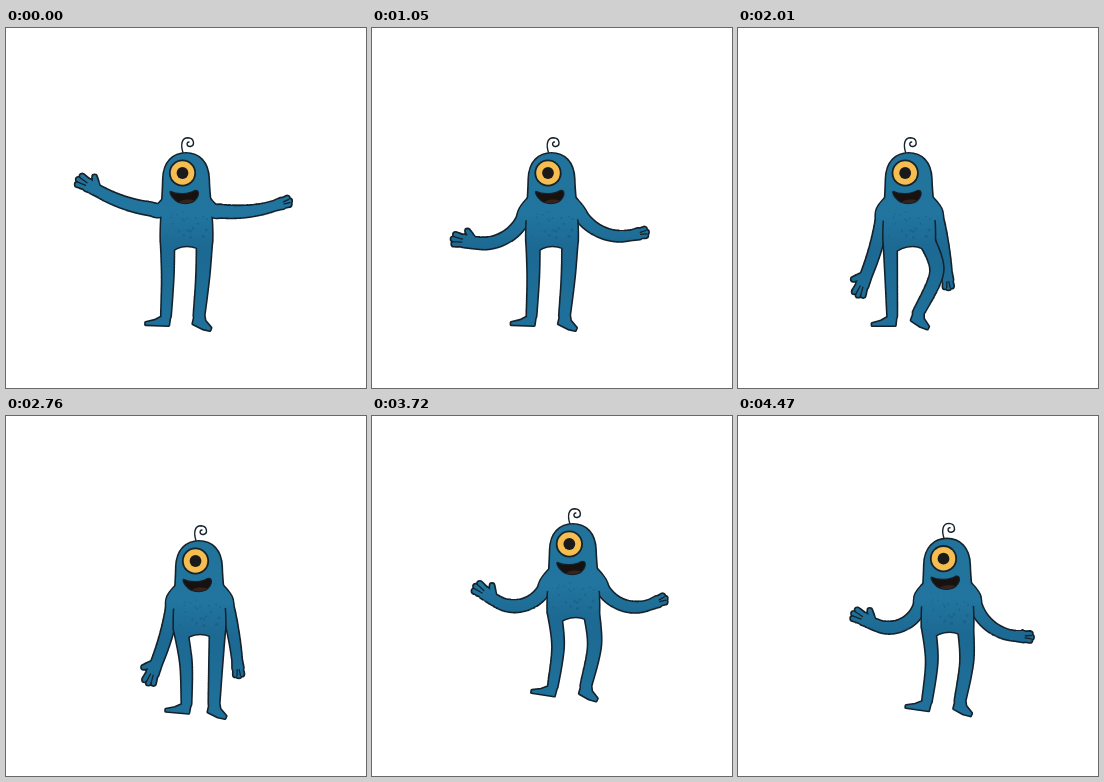
Animation, 360 px wide and 360 px high, one loop 4500 ms. Source, as an HTML page with a canvas:

```html
<!DOCTYPE html>
<html>
<head>
<meta charset="utf-8">
<title>Dancing monster</title>
<style>
html, body { margin: 0; width: 100%; height: 100%; overflow: hidden; background: #fff; }
canvas { display: block; width: 100vmin; height: 100vmin; }
</style>
</head>
<body>
<canvas id="stage" width="360" height="360"></canvas>
<script>
const ctx = document.getElementById('stage').getContext('2d');
const LOOP = 4500;
const INK = '#15222b';
const TAU = 2 * Math.PI;
const RAD = Math.PI / 180;

// An arm is an arc: heading at the shoulder, heading at the wrist (0 is outward, 90 is down).
// Knees give the sideways bend, feet the ankle offsets from the eye.
const pose = (left, right, knees, feet = [-16.5, 16.5]) => ({ left, right, knees, feet });

const open = pose([-4, -30], [10, -18], [1, 1]);
const shrug = pose([75, -10], [62, -12], [1, 1]);
const sidestep = pose([82, 68], [74, 84], [0, 14], [-13, 13]);
const stand = pose([82, 68], [74, 84], [2.5, 0], [-9, 18.5]);
const cheer = pose([52, -95], [66, -90], [7, 9]);
const drop = pose([90, 8], [74, 28], [2.5, 3.5]);
const greet = pose([88, -28], [82, 4], [4, 4]);

const timeline = [
  { time: 0, x: 176.5, ...open },
  { time: 540, x: 176.5, ...open },
  { time: 1050, x: 176, ...shrug },
  { time: 1640, x: 168, ...sidestep },
  { time: 2150, x: 167, ...sidestep },
  { time: 2760, x: 189.5, ...stand },
  { time: 3360, x: 192.5, ...cheer },
  { time: 4020, x: 201, ...drop },
  { time: 4470, x: 205.5, ...greet }
];

const mix = (a, b, k) => a + (b - a) * k;
const mixPair = (a, b, k) => a.map((v, i) => mix(v, b[i], k));

function poseAt(t) {
  const next = timeline.findIndex(key => key.time > t);
  if (next < 0) return timeline[timeline.length - 1];
  const a = timeline[next - 1], b = timeline[next];
  const u = (t - a.time) / (b.time - a.time);
  const k = u * u * (3 - 2 * u);
  const blended = { x: mix(a.x, b.x, k) };
  for (const part of ['left', 'right', 'knees', 'feet']) {
    blended[part] = mixPair(a[part], b[part], k);
  }
  return blended;
}

function bounce(t) {
  return t < 3350 ? 0 : 16 * Math.cos((t - 4364) / 459 * TAU) - 4;
}

function spline(p0, p1, p2, p3, u) {
  return p1.map((v, i) => v + 0.5 * u * (p2[i] - p0[i]
    + u * (2 * p0[i] - 5 * v + 4 * p2[i] - p3[i]
    + u * (3 * (v - p2[i]) + p3[i] - p0[i]))));
}

// Adds a tapered rounded tube through the points.
function tube(path, points, startWidth, endWidth, part = 1) {
  const spans = points.length - 1, detail = 20, steps = spans * detail;
  const at = i => points[Math.max(0, Math.min(spans, i))];
  for (let s = 0; s <= steps * part; s++) {
    const i = Math.min(spans - 1, Math.floor(s / detail));
    const [x, y] = spline(at(i - 1), at(i), at(i + 1), at(i + 2), s / detail - i);
    const r = mix(startWidth, endWidth, s / steps) / 2;
    path.moveTo(x + r, y);
    path.arc(x, y, r, 0, TAU);
  }
}

function polar([x, y], angle, length) {
  return [x + Math.cos(angle * RAD) * length, y + Math.sin(angle * RAD) * length];
}

function paint(path, fill) {
  ctx.strokeStyle = INK;
  ctx.lineWidth = 3.2;
  ctx.stroke(path);
  ctx.fillStyle = fill;
  ctx.fill(path);
}

function disc(x, y, r, fill) {
  ctx.fillStyle = fill;
  ctx.beginPath();
  ctx.arc(x, y, r, 0, TAU);
  ctx.fill();
}

function makeArm(x, side, headings, style) {
  const center = x + 4;
  const toStage = a => side < 0 ? 180 - a : a;
  const points = [[center + side * 14, 169], [center + side * 25.5, 182]];
  const pieces = 6;
  for (let i = 0; i < pieces; i++) {
    const heading = mix(headings[0], headings[1], (i + 0.5) / pieces);
    points.push(polar(points[i + 1], toStage(heading), style.length / pieces));
  }
  return { points, angle: toStage(headings[1]), ...style };
}

function drawArm({ points, angle, width, palm, reach, thumb }, skin) {
  const path = new Path2D();
  const wrist = points[points.length - 1];
  const fan = 13;
  tube(path, points, 13, width);
  tube(path, [wrist, polar(wrist, angle, palm)], width, width + 1.5);
  for (const side of [-1, 0, 1]) {
    const a = angle + side * fan;
    tube(path, [polar(wrist, a, palm - 2), polar(wrist, a, reach - Math.abs(side))], 5.5, 4);
  }
  if (thumb) tube(path, [wrist, polar(wrist, angle + 48, thumb)], 7, 3.6);
  paint(path, skin);
  ctx.lineWidth = 1.3;
  ctx.beginPath();
  for (const side of [-0.5, 0.5]) {
    ctx.moveTo(...polar(wrist, angle + side * fan, palm + 2));
    ctx.lineTo(...polar(wrist, angle + side * fan, reach));
  }
  ctx.stroke();
}

function addFoot(path, [x, y], tilt, corners) {
  const c = Math.cos(tilt * RAD), s = Math.sin(tilt * RAD);
  corners.forEach(([px, py], i) => {
    path[i ? 'lineTo' : 'moveTo'](x + px * c - py * s, y + px * s + py * c);
  });
  path.closePath();
}

// Adds a leg whose knee sits halfway, pushed aside by the bend; returns the ankle.
function addLeg(path, hip, ankleX, bend, hipWidth, ankleWidth) {
  const ankle = [ankleX, 288 - bend / 5];
  const knee = [(hip[0] + ankleX) / 2 + bend, 249 - bend / 3];
  tube(path, [hip, knee, ankle], hipWidth, ankleWidth);
  return ankle;
}

function drawBody({ x, knees, feet }, skin) {
  const path = new Path2D();
  const lean = (knees[0] + knees[1]) / 3;

  path.moveTo(x - 19, 151);
  path.bezierCurveTo(x - 18.5, 134, x - 9, 125.5, x + 3.5, 125.5);
  path.bezierCurveTo(x + 16, 125.5, x + 25.5, 134, x + 26, 151);
  path.bezierCurveTo(x + 26.5, 172, x + 30.5, 190, x + 29.5, 214);
  path.lineTo(x + 21, 226);
  path.bezierCurveTo(x + 14 + lean, 215, x - 6 + lean, 215, x - 13, 226);
  path.lineTo(x - 21.5, 214);
  path.bezierCurveTo(x - 22, 192, x - 19.5, 175, x - 19, 151);
  path.closePath();

  const left = addLeg(path, [x - 15, 213], x + feet[0], knees[0], 13, 9);
  const right = addLeg(path, [x + 22, 213], x + feet[1], knees[1], 15, 10);
  addFoot(path, left, knees[0] * 2, [[-4, 1], [4, 0], [3, 9.5], [-20, 9.5], [-20, 7.5], [-11, 5]]);
  addFoot(path, right, knees[1] / 2, [[-4, -1], [5, -1], [6, 5], [12, 12], [11, 14.5], [4, 13], [-6, 8]]);
  paint(path, skin);
}

function drawSpots(x) {
  const noise = n => Math.abs(Math.sin(n) * 43758.5) % 1;
  for (let i = 1; i < 22; i++) {
    const u = noise(i * 12.9898), v = noise(i * 78.233);
    disc(x - 17 + u * 42, 184 + v * 26, 0.8 + u * v, 'rgba(8, 58, 96, 0.22)');
  }
}

function drawFace(x) {
  disc(x, 145, 13.6, INK);
  disc(x, 145, 11.8, '#f6bd50');
  disc(x, 145, 5.9, '#1b1a1a');

  const mouth = new Path2D();
  mouth.moveTo(x - 11.5, 163.5);
  mouth.bezierCurveTo(x - 5, 167, x + 7, 166, x + 12, 162.5);
  mouth.bezierCurveTo(x + 16.5, 161.5, x + 17, 166, x + 14.5, 170);
  mouth.bezierCurveTo(x + 10, 177.5, x - 4, 177.5, x - 9.5, 170);
  mouth.bezierCurveTo(x - 12, 167, x - 13.5, 163, x - 11.5, 163.5);
  ctx.fillStyle = '#17110f';
  ctx.fill(mouth);
  ctx.save();
  ctx.clip(mouth);
  ctx.fillStyle = '#38231c';
  ctx.beginPath();
  ctx.ellipse(x + 4, 174, 8, 2.4, -0.1, 0, TAU);
  ctx.fill();
  ctx.restore();
  ctx.lineWidth = 1.2;
  ctx.strokeStyle = INK;
  ctx.stroke(mouth);
}

function drawCurl(x) {
  ctx.strokeStyle = INK;
  ctx.lineWidth = 1.4;
  ctx.beginPath();
  ctx.moveTo(x + 0.5, 124.5);
  ctx.bezierCurveTo(x - 2, 117, x - 1, 109.7, x + 5.5, 109.7);
  ctx.bezierCurveTo(x + 12, 110, x + 12.5, 117.5, x + 8, 118.5);
  ctx.bezierCurveTo(x + 4, 119, x + 3.5, 114, x + 6.5, 114);
  ctx.stroke();
}

function render(t) {
  ctx.fillStyle = '#fff';
  ctx.fillRect(0, 0, 360, 360);
  ctx.save();
  ctx.translate(0, bounce(t));
  ctx.lineJoin = ctx.lineCap = 'round';

  const skin = ctx.createLinearGradient(0, 125, 0, 300);
  skin.addColorStop(0, '#21739b');
  skin.addColorStop(0.35, '#21759e');
  skin.addColorStop(0.55, '#1c6993');
  skin.addColorStop(1, '#1f719b');

  const now = poseAt(t);
  const arms = [
    makeArm(now.x, -1, now.left, { length: 67, width: 10.5, palm: 11, reach: 22, thumb: 14 }),
    makeArm(now.x, 1, now.right, { length: 64, width: 9, palm: 7, reach: 15, thumb: 0 })
  ];
  drawCurl(now.x);
  arms.forEach(arm => drawArm(arm, skin));
  drawBody(now, skin);

  // Opens the body outline where the arms join.
  const joints = new Path2D();
  arms.forEach(arm => tube(joints, arm.points, 13, arm.width, 0.2));
  ctx.fillStyle = skin;
  ctx.fill(joints);

  drawSpots(now.x);
  drawFace(now.x);
  ctx.restore();
}

const start = performance.now();
function tick() {
  render((performance.now() - start) % LOOP);
  requestAnimationFrame(tick);
}
tick();
</script>
</body>
</html>
```
